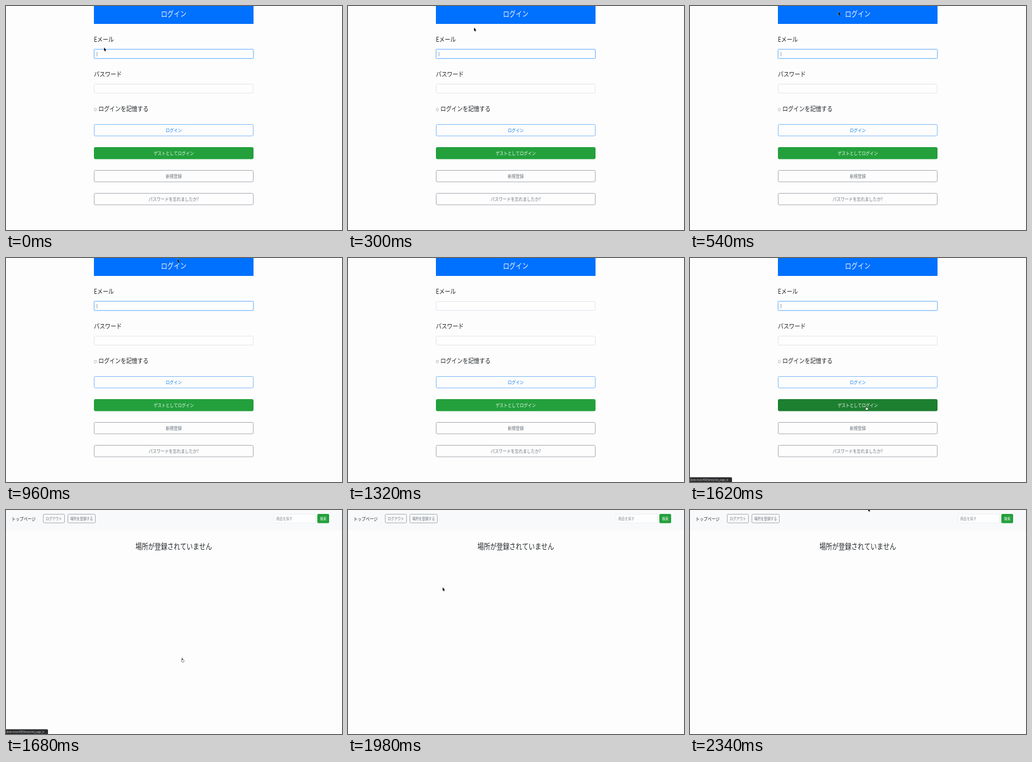
These frames come from a looping animation (600 px wide and 400 px high, 2400 ms). An HTML page with a canvas:

```html
<!DOCTYPE html>
<html lang="ja">
<head>
<meta charset="utf-8">
<title>ログイン</title>
<style>
  html, body { margin: 0; width: 100%; height: 100%; overflow: hidden; background: #fdfdfd; }
  canvas { display: block; width: 600px; height: 400px; }
</style>
</head>
<body>
<canvas id="stage" width="600" height="400"></canvas>
<script>
const ctx = document.getElementById('stage').getContext('2d');
const LOOP = 2400, STEP = 60;
const SQUEEZE = 0.85;
const FONT = '"Noto Sans CJK JP", "Noto Sans CJK", "Noto Sans", sans-serif';
const LATIN = '"Liberation Sans", Arial, sans-serif';
const SIZE = { title: 13.4, label: 11.7, button: 8.45, nav: 6.85, status: 5 };
const COLOR = {
  page: '#fdfdfd', nav: '#f8f9fa', ink: '#212529', blue: '#0070ff',
  green: '#23a03c', greenHover: '#1d7f30', outline: '#a3a8b0', muted: '#6c757d',
  field: '#e3e5ee', focus: '#80bdff', link: '#087bf5'
};
const FORM = { x: 157, w: 285, mid: 299.5 };

const EMAIL = [175, 74], HEADER = [265, 10], TOP = [318, -1], GUEST = [315, 264], REST = [169, 138];

function move(from, to, t, start, end) {
  const k = Math.min(1, Math.max(0, (t - start) / (end - start)));
  return from.map((v, i) => v + (to[i] - v) * k);
}

function pointerAt(t) {
  if (t < 540) return move(EMAIL, HEADER, t, 0, 540);
  if (t < 1200) return move(HEADER, TOP, t, 540, 1080);
  if (t < 1800) return move(TOP, GUEST, t, 1380, 1500);
  if (t < 2160) return move(GUEST, REST, t, 1800, 1980);
  return move(REST, [TOP[0], -4], t, 2100, 2340);
}

function text(str, x, y, size, color, align = 'left', weight = 500, family = FONT) {
  ctx.save();
  ctx.scale(SQUEEZE, 1);
  ctx.font = `${weight} ${size}px ${family}`;
  ctx.textAlign = align;
  ctx.textBaseline = 'middle';
  ctx.fillStyle = color;
  ctx.fillText(str, x / SQUEEZE, y);
  ctx.restore();
}

function box(x, y, w, h, fill, stroke) {
  ctx.beginPath();
  ctx.roundRect(x, y, w, h, 2);
  if (fill) { ctx.fillStyle = fill; ctx.fill(); }
  if (stroke) { ctx.strokeStyle = stroke; ctx.lineWidth = 1; ctx.stroke(); }
}

function field(y, focused) {
  const { x, w } = FORM;
  if (focused) box(x - 1, y - 1, w + 2, 19, '#d0e6ff');
  box(x + 0.5, y + 0.5, w - 1, 16, '#fefefe', focused ? COLOR.focus : COLOR.field);
  if (focused) {
    ctx.fillStyle = '#9a9fa6';
    ctx.fillRect(x + 5, y + 5, 1, 8);
  }
}

function loginPage(focused, hover) {
  const { x, w, mid } = FORM;
  ctx.fillStyle = COLOR.blue;
  ctx.fillRect(x, 0, w, 32);
  text('ログイン', mid, 13.5, SIZE.title, '#f4f9ff', 'center', 400);

  ['Eメール', 'パスワード'].forEach((label, i) => {
    const y = 60 + 62 * i;
    text(label, x, y, SIZE.label, COLOR.ink);
    field(y + 17, focused && i === 0);
  });
  box(x + 0.5, 182.5, 4, 5, '#fefefe', '#b0b3b8');
  text('ログインを記憶する', x + 8, 183.5, SIZE.label, COLOR.ink);

  const green = hover ? COLOR.greenHover : COLOR.green;
  const buttons = [
    { label: 'ログイン', color: COLOR.link, border: '#7bb6f8' },
    { label: 'ゲストとしてログイン', color: '#f4fbf5', border: green, fill: green },
    { label: '新規登録', color: COLOR.muted, border: COLOR.outline },
    { label: 'パスワードを忘れましたか?', color: COLOR.muted, border: COLOR.outline }
  ];
  buttons.forEach(({ label, color, border, fill }, i) => {
    const y = 211.5 + 41 * i;
    box(x + 0.5, y, w - 1, 20.5, fill, border);
    text(label, mid, y + 10.5, SIZE.button, color, 'center');
  });
}

function navButton(label, x, w) {
  box(x + 0.5, 7.5, w - 1, 15.5, null, COLOR.outline);
  text(label, x + w / 2, 15.5, SIZE.nav, COLOR.muted, 'center');
}

function topPage() {
  ctx.fillStyle = COLOR.nav;
  ctx.fillRect(0, 0, 600, 36);
  text('トップページ', 10, 15.5, SIZE.button, COLOR.ink);
  navButton('ログアウト', 66, 39);
  navButton('場所を登録する', 110, 50);
  box(478.5, 7.5, 74.5, 15.5, '#fefefe', '#eceef0');
  text('商品を探す', 482.5, 15.5, SIZE.nav, '#858c93');
  box(556, 7, 21, 16.5, COLOR.green);
  text('検索', 566.5, 15.5, SIZE.nav, '#f4fbf5', 'center');
  text('場所が登録されていません', FORM.mid, 64.5, SIZE.title, COLOR.ink, 'center');
}

function statusBar() {
  box(-3, 391.5, 78, 12, '#2b2c2e');
  text('demo-host:4000/entry/visit_page_in', 1, 396.5, SIZE.status, '#c8cacc', 'left', 400, LATIN);
}

function arrow(x, y) {
  ctx.strokeStyle = 'rgba(255,255,255,.7)';
  ctx.fillStyle = '#141518';
  ctx.lineWidth = 0.8;
  ctx.beginPath();
  ctx.moveTo(x, y);
  ctx.lineTo(x, y + 6);
  ctx.lineTo(x + 4, y + 4.5);
  ctx.closePath();
  ctx.stroke();
  ctx.fill();
  ctx.lineWidth = 1.2;
  ctx.strokeStyle = ctx.fillStyle;
  ctx.beginPath();
  ctx.moveTo(x + 1.5, y + 4);
  ctx.lineTo(x + 2.7, y + 7);
  ctx.stroke();
}

function hand(x, y) {
  box(x - 1.5, y + 3.5, 4.5, 4, '#fff', '#3c3e42');
  box(x - 1, y + 0.5, 1.5, 4, '#fff', '#3c3e42');
  ctx.fillStyle = '#fff';
  ctx.fillRect(x - 1, y + 4, 3.5, 3);
}

function draw(t) {
  ctx.fillStyle = COLOR.page;
  ctx.fillRect(0, 0, 600, 400);
  const away = t >= 1200 && t < 1380;
  const onLink = t >= 1500 && t < 1860;
  if (t < 1680) loginPage(!away, onLink);
  else topPage();
  if (onLink) statusBar();
  if (!away) (onLink ? hand : arrow)(...pointerAt(t));
}

function tick() {
  const t = performance.now() % LOOP;
  draw(Math.floor(t / STEP) * STEP);
  requestAnimationFrame(tick);
}
tick();
</script>
</body>
</html>
```
